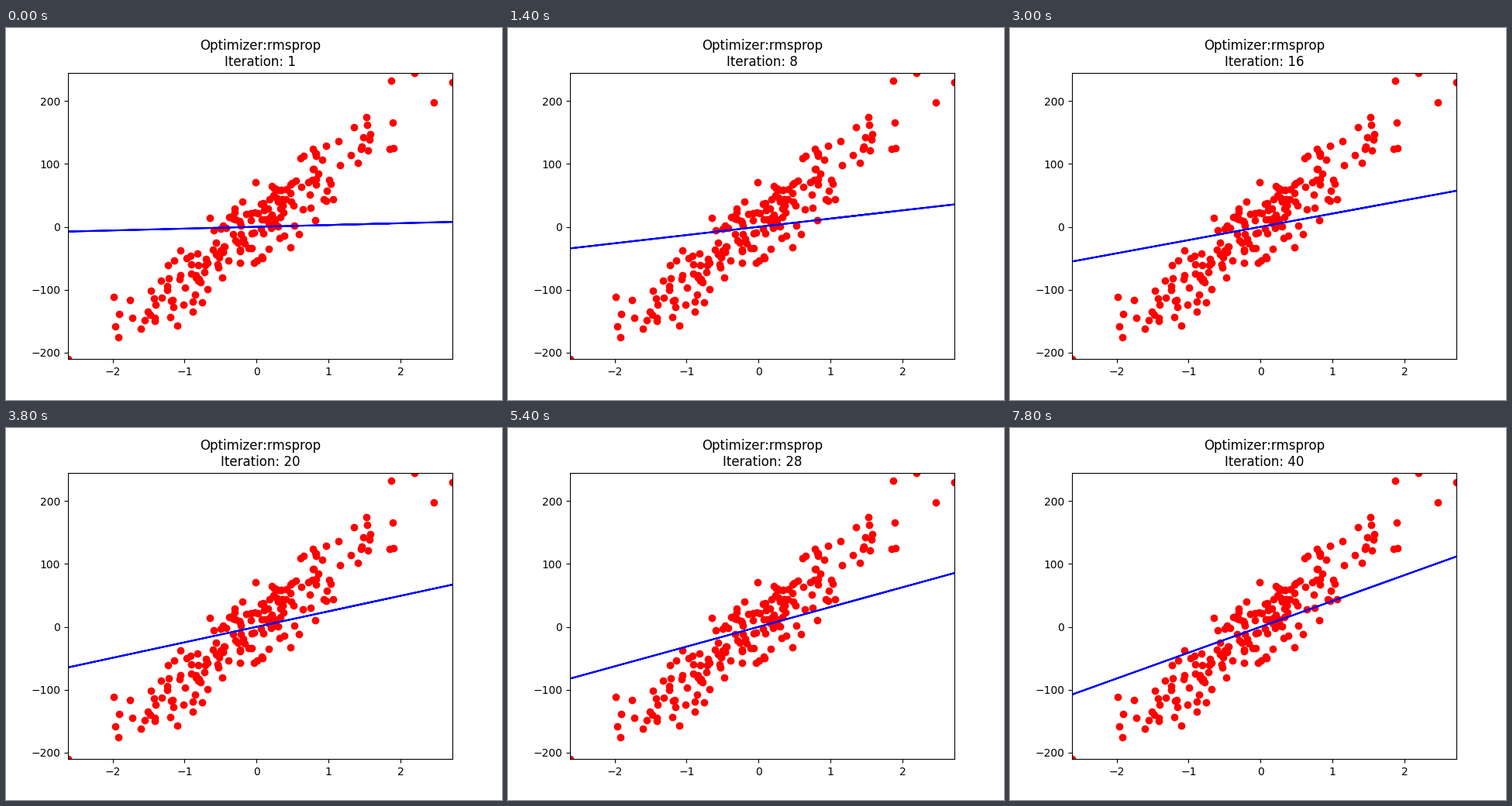
Write a matplotlib script that moves like this. It is 640 by 480 pixels and loops after 8 s.

```python
import numpy as np
import matplotlib.pyplot as plt
from matplotlib.animation import FuncAnimation

STEPS = 40
INTERVAL = 200
RATE, DECAY = 0.91, 0.9


def make_data(count=200, noise=30):
    """Noisy points around a random slope, in shuffled order."""
    rng = np.random.RandomState(42)
    x = rng.standard_normal(count)
    y = 100 * rng.uniform() * x
    y += rng.normal(scale=noise, size=count)
    order = np.arange(count)
    rng.shuffle(order)
    return x[order], y[order]


def fit_slopes(x, y):
    """Slope after each RMSprop step on the squared error."""
    slope, mean_sq, slopes = 0.0, 0.0, []
    for _ in range(STEPS):
        grad = np.mean(x * (slope * x - y))
        mean_sq = DECAY * mean_sq + (1 - DECAY) * grad ** 2
        slope -= RATE * grad / np.sqrt(mean_sq)
        slopes.append(slope)
    return slopes


x, y = make_data()
slopes = fit_slopes(x, y)

fig, ax = plt.subplots(figsize=(6.4, 4.8), dpi=100)
ax.scatter(x, y, color="red")
line, = ax.plot([], [], color="blue")
ax.set_xlim(x.min(), x.max())
ax.set_ylim(y.min(), y.max())
title = ax.set_title("")


def update(i):
    line.set_data(x, slopes[i] * x)
    title.set_text(f"Optimizer:rmsprop\nIteration: {i + 1}")
    return line, title


anim = FuncAnimation(fig, update, frames=STEPS, interval=INTERVAL,
                     repeat=True, repeat_delay=0)
plt.show()
```
